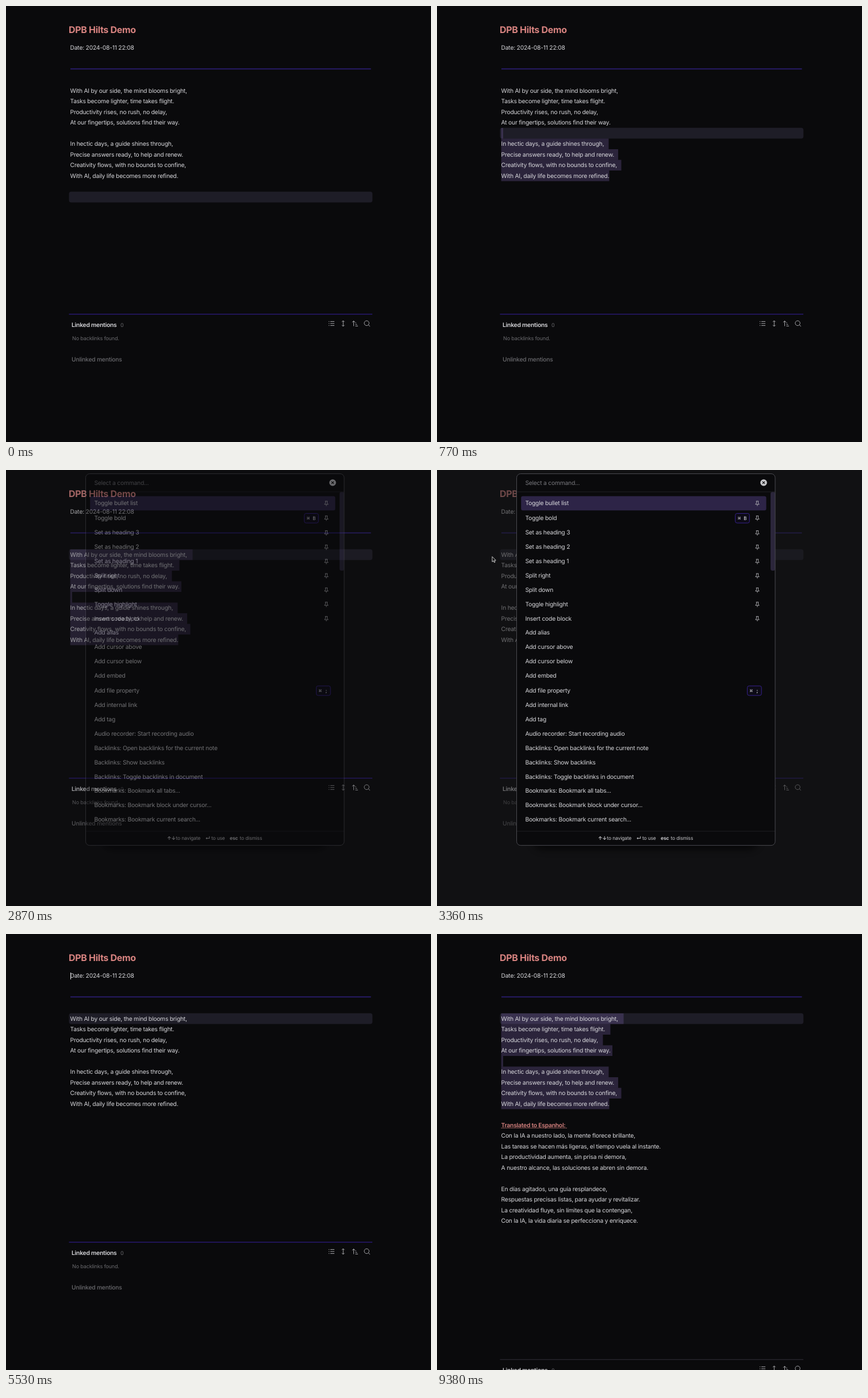
Recreate the animation shown at these times as an HTML page. Size 739x758 px, loop 9.52 s.

```html
<!DOCTYPE html>
<html lang="en">
<head>
<meta charset="utf-8">
<title>Note demo</title>
<style>
  html, body { margin: 0; height: 100%; overflow: hidden; background: #0a0a0c; }
  svg { display: block; width: 100vw; height: 100vh; text-rendering: geometricPrecision; }
  text { font-family: Inter, sans-serif; white-space: pre; }
  .key { font-family: "DejaVu Sans Mono", monospace; }
</style>
</head>
<body>
<svg id="stage" viewBox="0 0 739 758"></svg>
<script>
const LOOP = 9520;
const TOP = 138, ROW = 18.5, LEFT = 111.6;
const BG = '#0a0a0c', INK = '#d7d7db', ROSE = '#d88380', GRAY = '#6a6a6e';

const poem = [
  'With AI by our side, the mind blooms bright,',
  'Tasks become lighter, time takes flight.',
  'Productivity rises, no rush, no delay,',
  'At our fingertips, solutions find their way.',
  '',
  'In hectic days, a guide shines through,',
  'Precise answers ready, to help and renew.',
  'Creativity flows, with no bounds to confine,',
  'With AI, daily life becomes more refined.'
];
const selectionEnds = [324.5, 301.5, 288.5, 305, 115, 298.5, 315, 320.5, 299.5];

const translation = [
  'Con la IA a nuestro lado, la mente florece brillante,',
  'Las tareas se hacen más ligeras, el tiempo vuela al instante.',
  'La productividad aumenta, sin prisa ni demora,',
  'A nuestro alcance, las soluciones se abren sin demora.',
  '',
  'En días agitados, una guía resplandece,',
  'Respuestas precisas listas, para ayudar y revitalizar.',
  'La creatividad fluye, sin límites que la contengan,',
  'Con la IA, la vida diaria se perfecciona y enriquece.'
];

const PINNED = 9;
const commands = [
  'Toggle bullet list', 'Toggle bold', 'Set as heading 3', 'Set as heading 2',
  'Set as heading 1', 'Split right', 'Split down', 'Toggle highlight', 'Insert code block',
  'Add alias', 'Add cursor above', 'Add cursor below', 'Add embed', 'Add file property',
  'Add internal link', 'Add tag', 'Audio recorder: Start recording audio',
  'Backlinks: Open backlinks for the current note', 'Backlinks: Show backlinks',
  'Backlinks: Toggle backlinks in document', 'Bookmarks: Bookmark all tabs...',
  'Bookmarks: Bookmark block under cursor...', 'Bookmarks: Bookmark current search...',
  'Delete current file', 'Delete paragraph', 'Move line down',
  'DPB Hilts: Ask', 'DPB Hilts: Fix grammar', 'DPB Hilts: Rewrite selection',
  'DPB Hilts: Summarize selection', 'DPB Hilts: Translate selection'
].map((name, i) => ({
  name, pinned: i < PINNED,
  key: { 'Toggle bold': 'B', 'Add file property': ';' }[name]
}));

const within = (t, ...spans) => spans.some(([a, b]) => t >= a && t < b);

const text = (x, y, s, { size = 10.3, fill = INK, weight = 400, track = -0.0214 } = {}) =>
  `<text x="${x}" y="${y}" font-size="${size}" fill="${fill}" font-weight="${weight}" letter-spacing="${track * size}">${s}</text>`;
const rect = (x, y, w, h, fill, r = 0, extra = '') =>
  `<rect x="${x}" y="${y}" width="${w}" height="${h}" rx="${r}" fill="${fill}" ${extra}/>`;
const stroke = (d, color, width = 1, extra = '') =>
  `<path d="${d}" fill="none" stroke="${color}" stroke-width="${width}" ${extra}/>`;
const caret = (x, y) => rect(x, y, 1, 12, '#e4e4e8');
const noteLine = (s, i) => text(LEFT, TOP + 12.5 + i * ROW, s);

// Selection runs backwards from the end of the poem up to the dragged head.
function dragHead(t) {
  if (t >= 1260) return { line: 0, x: LEFT };
  const step = Math.floor((t - 490) / 70);
  return {
    line: Math.max(1, 8 - Math.max(0, step)),
    x: LEFT + Math.max(0, 187 * (8 - step) / 10)
  };
}

function selection(t) {
  const { line, x } = dragHead(t);
  return selectionEnds.map((end, i) => {
    if (i < line) return '';
    const start = i === line && poem[i] ? Math.min(x, end) : LEFT;
    return rect(start, TOP + i * ROW, end - start, ROW, 'rgba(120,96,170,.3)');
  }).join('');
}

function mentions(dy, rule) {
  return `<g transform="translate(0 ${dy})">`
    + stroke('M109.5 535.8H637', rule, 1.4)
    + text(114, 557.8, 'Linked mentions', { weight: 600 })
    + text(199, 557.8, '0', { size: 9, fill: GRAY })
    + text(115, 581, 'No backlinks found.', { size: 9.1, fill: GRAY })
    + text(114, 617.6, 'Unlinked mentions', { weight: 500, fill: GRAY })
    + stroke('M564 548.5h7M564 552h7M564 555.5h7M561 548.5h1.3M561 552h1.3M561 555.5h1.3'
      + 'M586.3 547v10M584 549.3l2.3-2.3 2.3 2.3M584 554.7l2.3 2.3 2.3-2.3'
      + 'M604.5 556.5v-9M602 550l2.5-2.5 2.5 2.5M607.5 551h1.5M607.5 553.7h3M607.5 556.4h4.5'
      + 'M631.3 551.4a4.2 4.2 0 1 1-8.4 0a4.2 4.2 0 1 1 8.4 0M630.2 554.5l2.8 2.6', '#a4a4a8')
    + '</g>';
}

function note(t) {
  const active = t < 350 ? 10 : t < 1260 ? dragHead(t).line : 0;
  const translated = t >= 7280;
  let out = text(109, 47, 'DPB Hilts Demo', { size: 16, fill: ROSE, weight: 750, track: -0.02 })
    + text(LEFT, 76.4, 'Date: 2024-08-11 22:08')
    + stroke('M112 109.4H634.5', '#2a1c72', 1.6)
    + rect(109.5, TOP + active * ROW - 0.2, 527.7, ROW + 0.2, '#1e1d27', 4);
  if (within(t, [490, 2940], [5600, LOOP])) out += selection(t);
  out += poem.map(noteLine).join('');
  if (translated) {
    out += text(LEFT, TOP + 12.5 + 10 * ROW, 'Translated to Espanhol:', { fill: ROSE, weight: 600 })
      + stroke('M111.6 337.3H226', ROSE, 1, 'stroke-dasharray="1.6 .9"')
      + translation.map((s, i) => noteLine(s, i + 11)).join('');
  }
  if (within(t, [1260, 1680], [2310, 2870], [5670, 6090], [6720, 7840], [8540, 9170])) out += caret(111, 141);
  if (within(t, [5530, 5600])) out += caret(112, 67);
  return out + (translated ? mentions(203.9, '#25232b') : mentions(0, '#27186e'));
}

function commandRow({ name, pinned, key }, mid) {
  let out = text(153.4, mid + 3.5, name);
  if (pinned) {
    out += stroke(`M554.8 ${mid - 3.5}h4.4m-.7 0v3.3l1.7 2.3h-6.4l1.7-2.3v-3.3M557 ${mid + 2.1}v2.9`, '#b4b4b8', 0.9);
  }
  if (key) {
    const x = pinned ? 518.7 : 539.6;
    out += rect(x, mid - 7.8, 24.6, 16.6, '#0d0b16', 3, 'stroke="#36218c"')
      + `<text class="key" x="${x + 4.2}" y="${mid + 3.6}" font-size="8.6" fill="#e0e0e4">⌘ ${key}</text>`;
  }
  return out;
}

function palette(t) {
  const typed = t < 3780 ? '' : t < 4060 ? 'd' : 'dp';
  const query = t < 3850 ? '' : typed;
  const shown = commands.filter(c => c.name.toLowerCase().includes(query)).slice(0, 23);

  let y = 45.2, rows = '';
  for (const command of shown) {
    const height = command.key ? 26.5 : 24.85;
    if (y < 46) rows += rect(146.2, y + 0.3, 426.3, height, '#2d2447', 3);
    rows += commandRow(command, y + height / 2);
    y += height;
  }
  const foot = y + 8, bottom = foot + 24.6;
  const hint = (x, s, weight = 400) => text(x, foot + 15, s, { size: 8.5, weight, fill: '#c6c6ca' });

  let out = rect(165, bottom - 60, 396, 68, '#000', 20, 'opacity=".55" style="filter:blur(6px)"')
    + rect(138.5, 6.5, 449.5, bottom - 6.5, BG, 7)
    + rows
    + (shown.length > 20 ? rect(580, 38, 8, 137, '#2b263b', 3.5) : '')
    + stroke(`M139 38H588M139 ${foot}H588`, '#202024')
    + rect(138.5, 6.5, 449.5, bottom - 6.5, 'none', 7, 'stroke="#4a4a50"')
    + text(153.4, 25.6, typed || 'Select a command...', { fill: typed ? INK : '#77777c' })
    + '<circle cx="568" cy="22" r="5.8" fill="#c8c8cc"/>'
    + stroke('M565.8 19.8l4.4 4.4m0-4.4l-4.4 4.4', BG, 1.2)
    + hint(280, '↑↓', 700) + hint(295.6, 'to navigate')
    + hint(346.6, '↵', 700) + hint(357, 'to use')
    + hint(389, 'esc', 700) + hint(406.6, 'to dismiss');
  if (within(t, [3080, 3360], [3780, 4550], [5040, 5530])) {
    out += caret([154, 160, 166][typed.length], 16);
  }
  return out;
}

function scene(t) {
  let out = rect(0, 0, 739, 758, BG) + note(t);
  if (within(t, [2870, 5530])) {
    out += `<g opacity="${t < 2940 ? 0.5 : 1}">`
      + rect(0, 0, 739, 758, 'rgba(24,24,27,.55)') + palette(t) + '</g>';
  }
  if (within(t, [3010, 3780])) {
    out += `<path d="M96 150.6v9l2.1-1.9 1.4 3.1 1.5-.7-1.4-3h2.7z" fill="#000" stroke="#e8e8e8" stroke-width=".9"/>`;
  }
  return out;
}

const stage = document.getElementById('stage');
let start, drawn;
function frame(now) {
  start ??= now;
  const markup = scene((now - start) % LOOP);
  if (markup !== drawn) stage.innerHTML = drawn = markup;
  requestAnimationFrame(frame);
}
requestAnimationFrame(frame);
</script>
</body>
</html>
```
